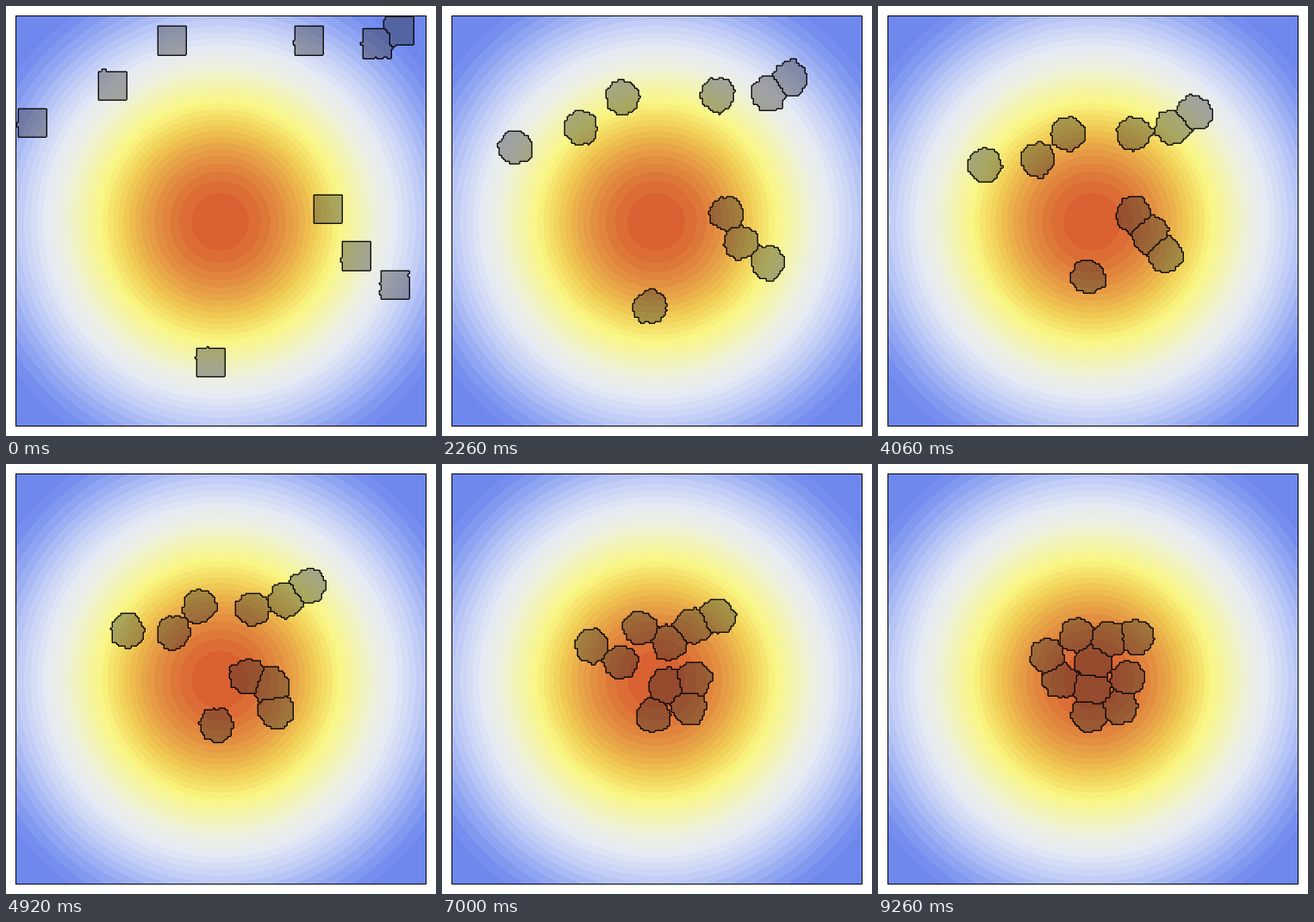
Write a matplotlib script that moves like this. It is 499 px wide and 499 px high and loops after 9.28 s.

```python
"""Ten cells climb a chemical gradient and clump together at its peak."""
from functools import lru_cache

import matplotlib.pyplot as plt
import numpy as np
from matplotlib.animation import FuncAnimation

SIZE, DPI = 499, 100
LEFT, PITCH, GRID = 11.5, 2.38, 200      # lattice origin and spacing in pixels
PAD, REACH = 24, 16                      # lattice margin, half window per cell
SLOT, SLOTS = 20, 464                    # ms, count
SHOWN = (0, 1, 1, 1, 1, 1, 2)            # every third step is held five slots
STEPS = 200
PEAK = np.array([248, 250])
SPREAD = 45000
BANDS = 41

# Start and resting place relative to the peak in pixels, and pace
CELLS = np.array([
    (-218, -115, -44, -23, 0.93),
    (-125, -158, -36, 5, 0.95),
    (-56, -210, -17, -51, 1.05),
    (103, -210, 0, -17, 1.05),
    (183, -207, 16, -44, 1.15),
    (208, -222, 45, -41, 1.12),
    (125, -15, -4, 12, 0.7),
    (158, 40, 42, -2, 1),
    (203, 73, 33, 33, 1.2),
    (-11, 163, -3, 41, 1.05),
])
START, REST, PACE = CELLS[:, :2], CELLS[:, 2:4], CELLS[:, 4]
COUNT = len(CELLS)

rng = np.random.default_rng(12)
WAVES = np.array([2, 3, 5, 7, 11])
PHASE = rng.uniform(0, 2 * np.pi, (COUNT, len(WAVES)))
SPIN = rng.uniform(-0.5, 0.5, (COUNT, len(WAVES)))


def spread_out(pos, gap=30, rounds=8):
    """Push apart centres that are closer than the gap."""
    for _ in range(rounds):
        diff = pos[:, None] - pos[None]
        dist = np.hypot(diff[..., 0], diff[..., 1])
        push = np.clip(gap - dist, 0, None) / np.maximum(dist, 1)
        pos = pos + 0.25 * (diff * push[..., None]).sum(axis=1)
    return pos


def walk():
    """Centres at every step: steady climb that slows down near the peak."""
    far = np.hypot(*START.T)
    left, path = far.copy(), []
    for _ in range(STEPS):
        u = (left / far)[:, None]
        path.append(PEAK + spread_out(u * START + (1 - u) ** 3 * REST))
        left -= 1.55 * PACE * left / (left + 25)
    return path


PATH = walk()


def gradient():
    """Banded bell curve coloured blue, white, yellow, red."""
    y, x = np.mgrid[:SIZE, :SIZE]
    level = np.exp(-((x - PEAK[0]) ** 2 + (y - PEAK[1]) ** 2) / SPREAD)
    level = np.ceil(level * BANDS) / BANDS
    radii = np.array([288, 230, 200, 180, 135, 108, 0])
    colours = np.array([(110, 136, 238), (192, 204, 247), (229, 234, 244), (237, 240, 226),
                        (249, 246, 130), (241, 205, 85), (217, 97, 50)])
    stops = np.exp(-radii**2 / SPREAD)
    rgb = np.stack([np.interp(level, stops, c) for c in colours.T], axis=-1)
    ring = np.maximum(abs(x - 249), abs(y - 249))
    rgb[ring > 238] = 255
    rgb[ring == 238] = 0
    return rgb


def cell_field(centre, phase, square):
    """Rippled squared distance to a cell inside a small window."""
    cx, cy = (centre - LEFT) / PITCH - 0.5 + PAD
    x0, y0 = int(round(cx)) - REACH, int(round(cy)) - REACH
    span = np.arange(2 * REACH + 1)
    dx, dy = (span + x0 - cx)[None, :], (span + y0 - cy)[:, None]
    box = np.maximum(abs(dx), abs(dy)) ** 2 * 1.27
    dist = square * box + (1 - square) * (dx**2 + dy**2)
    angle = np.arctan2(dy, dx)
    ripple = np.cos(angle[..., None] * WAVES + phase).sum(axis=-1)
    return x0, y0, dist * (1 + 0.05 * (1 - square / 2) * ripple)


def claim(cost, weight, glue=18):
    """Nearest cell per site; glue fills the gaps between neighbours."""
    cost = cost - weight[:, None, None]
    taken = np.exp(-cost / glue).sum(axis=0) > 1
    return (np.argmin(cost, axis=0) + 1) * taken


@lru_cache(maxsize=None)
def labels(step):
    """Cell number of every lattice site, 0 for the medium."""
    square = np.exp(-step / 5)
    fields = [cell_field(c, p, square) for c, p in zip(PATH[step], PHASE + SPIN * step)]
    x0, y0 = (min(f[i] for f in fields) for i in (0, 1))
    side = 2 * REACH + 1
    width = max(f[0] for f in fields) - x0 + side
    height = max(f[1] for f in fields) - y0 + side
    cost = np.full((COUNT, height, width), 1e4, np.float32)
    for layer, (x, y, dist) in zip(cost, fields):
        layer[y - y0:y - y0 + side, x - x0:x - x0 + side] = dist

    # Widen squeezed cells until all areas agree
    area = 212 - 14 * square
    weight = np.full(COUNT, area / np.pi, np.float32)
    for _ in range(7):
        sizes = np.bincount(claim(cost, weight).ravel(), minlength=COUNT + 1)[1:]
        weight += (0.6 * (area - sizes) / np.pi).astype(np.float32)

    grid = np.zeros((GRID + 2 * PAD,) * 2, np.uint8)
    grid[y0:y0 + height, x0:x0 + width] = claim(cost, weight)
    return grid[PAD:-PAD, PAD:-PAD]


BACK = gradient()
SHADED = BACK * 0.62 + 40 * 0.38
SITE = np.floor((np.arange(12, 487) + 0.5 - LEFT) / PITCH).astype(int).clip(0, GRID - 1)


@lru_cache(maxsize=2)
def picture(step):
    cells = np.zeros((SIZE, SIZE), np.uint8)
    cells[12:487, 12:487] = labels(step)[np.ix_(SITE, SITE)]
    across = cells[:, 1:] != cells[:, :-1]
    down = cells[1:] != cells[:-1]
    ink = np.zeros(cells.shape)
    ink[:, :-1][across] = 0.4
    ink[:-1][down] = 0.4
    ink[:, 1:][across] = 0.92
    ink[1:][down] = 0.92
    rgb = np.where(cells[..., None] > 0, SHADED, BACK)
    return (rgb * (1 - ink[..., None])).round().astype(np.uint8)


fig = plt.figure(figsize=(SIZE / DPI, SIZE / DPI), dpi=DPI)
ax = fig.add_axes([0, 0, 1, 1])
ax.axis("off")
image = ax.imshow(picture(0), interpolation="nearest", aspect="auto")


def update(slot):
    step = 3 * (slot // len(SHOWN)) + SHOWN[slot % len(SHOWN)]
    image.set_data(picture(step))
    return [image]


anim = FuncAnimation(fig, update, frames=SLOTS, interval=SLOT, repeat=True, repeat_delay=0)
plt.show()
```
